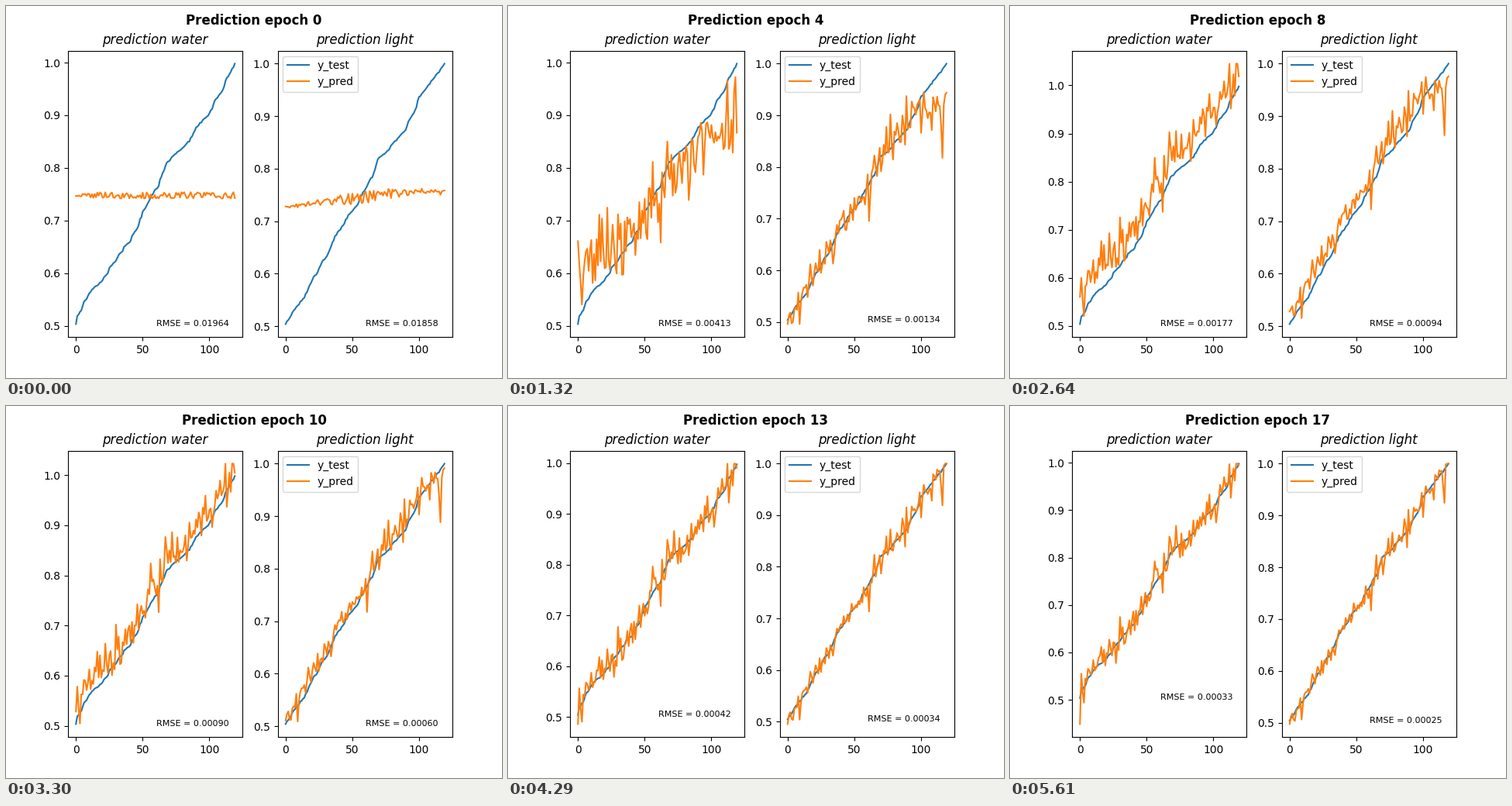
A matplotlib script that plays this animation: 640 by 480 pixels, repeating every 5940 ms.

```python
import numpy as np
import matplotlib.pyplot as plt
from matplotlib.animation import FuncAnimation

plt.rcParams["font.family"] = "DejaVu Sans"

EPOCHS = 18
COUNT = 120
SAMPLES = np.arange(COUNT)
STAGES = [0, 2, 4, 8, 12, 15, 17]


def staircase(rng, knots):
    """Rise through evenly spaced knots in small steps of random height."""
    steps = np.cumsum(rng.gamma(4, size=COUNT))
    at = np.linspace(0, COUNT, len(knots)).astype(int)
    at[-1] = COUNT - 1
    return np.interp(steps, steps[at], knots)


class Panel:
    """A rising test curve and a noisy prediction that converges on it.

    Each stage gives the share of the test curve the prediction follows, its
    offset, the spread of its jitter, its first value and its ceiling.
    """

    def __init__(self, seed, knots, noise, outliers, skew, envelope, stages, errors):
        rng = np.random.default_rng(seed)
        self.test = staircase(rng, knots)
        self.residual = rng.normal(0, noise, COUNT)
        for sample, value in outliers.items():
            self.residual[sample] = value
        self.jitter = skew * envelope * (2 * rng.beta(0.6, 0.8, COUNT) - 1)
        self.stages = np.transpose(stages)
        self.errors = np.log(errors)

    def state(self, epoch):
        follow, offset, spread, start, ceiling = (
            np.interp(epoch, STAGES, column) for column in self.stages)
        low = min(self.test[0], start)
        high = max(self.test[-1], ceiling)

        centre = np.minimum(follow * self.test + offset, ceiling)
        gain = follow * (1 + 15 * spread)
        prediction = centre + gain * self.residual + spread * self.jitter
        prediction[0] = start
        error = np.exp(np.interp(epoch, STAGES, self.errors))
        return np.clip(prediction, low, high), error, low, high


water = Panel(
    seed=4,
    knots=[.5035, .562, .587, .624, .658, .717, .760,
           .813, .838, .877, .904, .948, .998],
    noise=.018,
    outliers={1: .036, 27: -.038, 67: .041, 72: .046, 97: .038, 102: -.038, 113: -.045},
    skew=1,
    envelope=np.clip(0.25 + SAMPLES / 25, 0, 1),
    stages=[
        (0, .748, .006, .747, .998),
        (.05, .73, .05, .735, .998),
        (.68, .235, .05, .661, .998),
        (1, .04, .018, .560, 1.0453),
        (1, 0, .006, .4972, 1),
        (1, 0, .002, .4628, .998),
        (1, 0, 0, .4487, .998),
    ],
    errors=[.01964, .01689, .00413, .00177, .00046, .00035, .00033],
)

light = Panel(
    seed=11,
    knots=[.504, .541, .588, .630, .682, .719, .762,
           .821, .847, .874, .937, .969, 1.0],
    noise=.011,
    outliers={9: -.033, 61: -.05, 70: -.035, 74: .028, 89: .04, 100: -.04, 116: -.065},
    skew=-1,
    envelope=0.15 + 0.85 * np.sin(np.pi * SAMPLES / COUNT) ** 2,
    stages=[
        (.07, .692, .012, .728, .757),
        (1, .01, .06, .555, .895),
        (1, 0, .03, .496, .915),
        (1, .02, .02, .528, .95),
        (1, 0, .006, .494, .985),
        (1, 0, .002, .497, 1),
        (1, 0, 0, .4975, 1),
    ],
    errors=[.01858, .00303, .00134, .00094, .00038, .00028, .00025],
)

fig, axes = plt.subplots(1, 2, figsize=(6.4, 4.8), dpi=100)
heading = fig.suptitle("", fontweight="bold")
views = []
for ax, panel, name in zip(axes, (water, light), ("water", "light")):
    ax.set_title(f"prediction {name}", fontstyle="italic")
    ax.plot(SAMPLES, panel.test, label="y_test")
    line, = ax.plot(SAMPLES, panel.test, label="y_pred")
    note = ax.text(60, 0.5, "", fontsize=8)
    views.append((ax, panel, line, note))
axes[1].legend(loc="upper left")


def update(epoch):
    heading.set_text(f"Prediction epoch {epoch}")
    for ax, panel, line, note in views:
        prediction, error, low, high = panel.state(epoch)
        line.set_ydata(prediction)
        note.set_text(f"RMSE = {error:.5f}")
        margin = 0.05 * (high - low)
        ax.set_ylim(low - margin, high + margin)
    return []


anim = FuncAnimation(fig, update, frames=EPOCHS, interval=330, repeat=True,
                     repeat_delay=0, blit=False)
plt.show()
```
